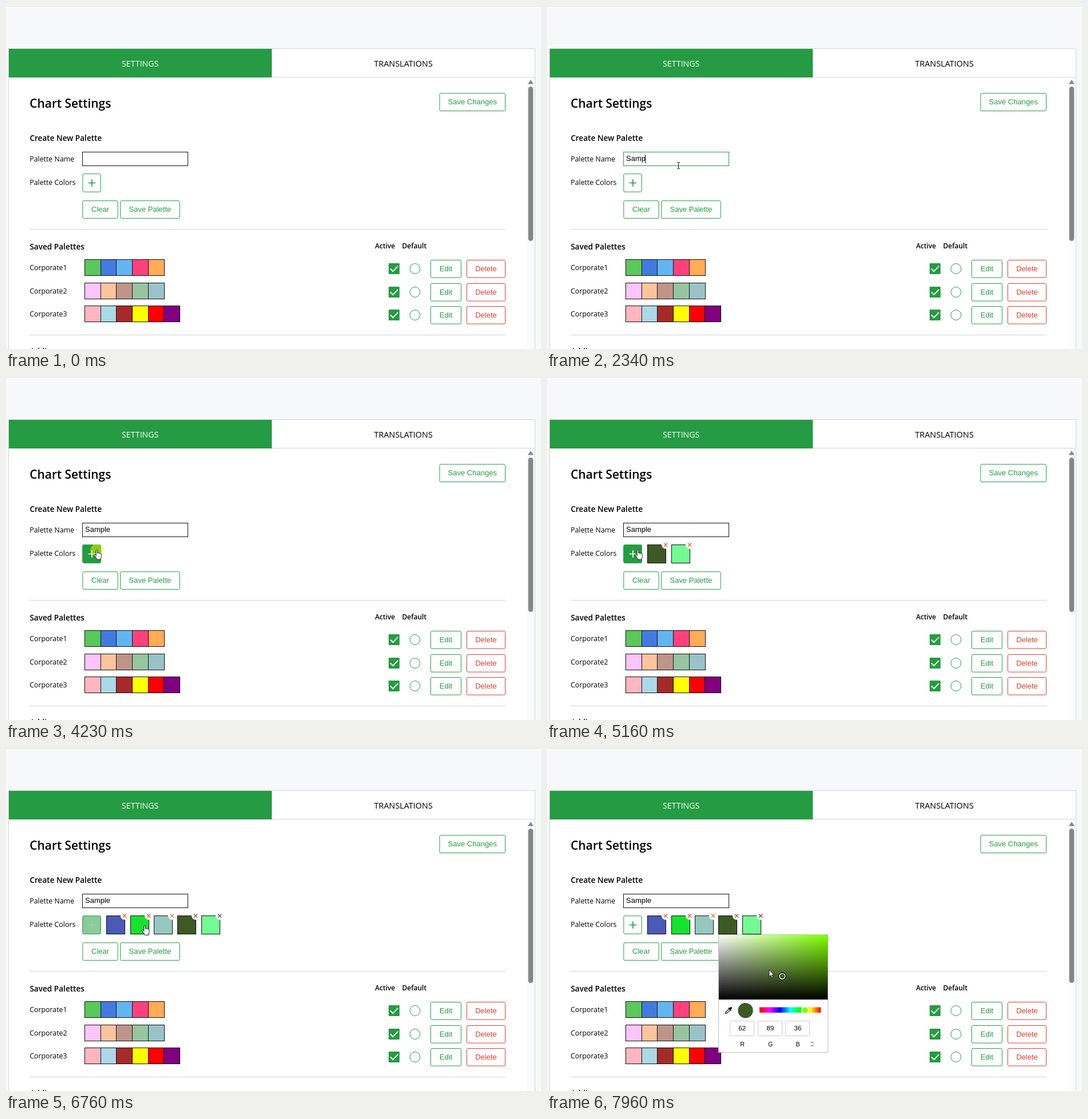
These frames come from a looping animation (934 px wide and 600 px high, 8000 ms). An HTML page:

```html
<!DOCTYPE html>
<html lang="en">
<head>
<meta charset="utf-8">
<title>Chart Settings</title>
<style>
  html, body { margin: 0; width: 100%; height: 100%; overflow: hidden; background: #f7f8fa; }
  svg { display: block; width: 934px; height: 600px; }
  .ui { font-family: "Open Sans", "Noto Sans", sans-serif; }
  .ctl { font-family: "Liberation Sans", Arial, sans-serif; font-size: 13px; }
  .semi { font-weight: 600; }
  .mid { text-anchor: middle; }
</style>
</head>
<body>
<svg id="stage" viewBox="0 0 934 600" xmlns="http://www.w3.org/2000/svg"></svg>
<script>
const LOOP = 8000;
const GREEN = '#259b43', RED = '#dc3e30', LINE = '#d2d4d6';

// Markup helpers
const rect = (x, y, w, h, fill, extra = '') =>
  `<rect x="${x}" y="${y}" width="${w}" height="${h}" fill="${fill}" ${extra}/>`;
const frame = (x, y, w, h, stroke, fill = '#fff', extra = '') =>
  rect(x + .5, y + .5, w - 1, h - 1, fill, `stroke="${stroke}" ${extra}`);
const path = (d, stroke, width = 1, fill = 'none', extra = '') =>
  `<path d="${d}" stroke="${stroke}" stroke-width="${width}" fill="${fill}" ${extra}/>`;
const circle = (x, y, r, fill, extra = '') =>
  `<circle cx="${x}" cy="${y}" r="${r}" fill="${fill}" ${extra}/>`;
const text = (s, x, y, size, cls = 'ui', fill = '#000') =>
  `<text x="${x}" y="${y}" class="${cls}" style="font-size:${size}px" fill="${fill}">${s}</text>`;
const button = (s, x, y, w, h, color = GREEN) =>
  frame(x, y, w, h, color, '#fff', 'rx="2"') + text(s, x + w / 2, y + h / 2 + 4, 13, 'ctl mid', color);
const plusButton = (fill, mark) =>
  frame(133.4, 293.2, 32.4, 32.5, GREEN, fill, 'rx="2"') +
  path('M143.7 309.5h12.6M150 303.2v12.6', mark, 1.7);
const group = (id, body) => `<g id="${id}">${body}</g>`;

function page() {
  return rect(0, 0, 934, 600, '#f7f8fa') + rect(0, 0, 934, 1, '#e4e6e8') +
    frame(4, 74, 920, 540, LINE) +
    rect(5, 124, 918, 1, LINE) + rect(5, 75, 459, 50, GREEN) +
    text('SETTINGS', 234.2, 106, 14.2, 'ui mid', '#fff') +
    text('TRANSLATIONS', 693.7, 106, 14.4, 'ui mid') +
    rect(909, 125, 14, 475, '#fcfcfc') +
    path('M911 136.4L916 129L921 136.4Z', 'none', 0, '#868686') +
    rect(911.7, 141, 8.6, 270, '#868686', 'rx="4.3"') +
    text('Chart Settings', 41.3, 177.8, 20.9, 'ui semi') +
    button('Save Changes', 756.5, 152.2, 115.5, 31.8) +
    text('Create New Palette', 41.4, 236.3, 13.6, 'ui semi') +
    text('Palette Name', 41.2, 272.3, 12.4) +
    text('Palette Colors', 41.2, 312.5, 12.4) +
    button('Clear', 133.4, 340.2, 62.3, 31.7) +
    button('Save Palette', 199.1, 340.2, 104.6, 31.7) +
    rect(41, 390, 831, 1, LINE) + rect(41, 575, 831, 1, LINE) +
    text('Saved Palettes', 41.4, 425.5, 13.6, 'ui semi') +
    text('Active', 661.7, 423.5, 11.9, 'ui semi mid') +
    text('Default', 712.8, 423.5, 12, 'ui semi mid') +
    text('Adding', 41.4, 609, 13.6, 'ui semi');
}

function savedRow(colors, i) {
  const y = Math.round(443 + i * 40.6), cy = y + 16.5;
  const cells = colors.map((c, k) =>
    frame(Math.round(137 + k * 27.67), y, 29, 29, '#111', c)).join('');
  return text('Corporate' + (i + 1), 41.2, y + 19, 12.35) + cells +
    rect(668, cy - 9.5, 19, 19, GREEN, 'rx="1"') +
    path(`M671 ${cy}l4.5 4.6l8.8-9.2`, '#fff', 1.8) +
    circle(714, cy, 8.9, '#fff', `stroke="${GREEN}"`) +
    button('Edit', 741, y + 1, 54, 31.6) +
    button('Delete', 804, y + 1, 68, 31.6, RED);
}

const saved = [
  ['#5ac85a', '#447ae0', '#63b5f2', '#fc417d', '#ffab57'],
  ['#fcc4fc', '#fcc49e', '#c0948a', '#97c5a0', '#9ac3c9'],
  ['#ffb6c1', '#add8e6', '#a52a2a', '#ffff00', '#ff0000', '#800080']
];

// Newest colour comes first
const added = ['#4b5ab5', '#18e130', '#96c8c0', '#3e5924', '#74fa93'];
const crossColors = ['#d8432f', '#d8432f', '#a8801c', '#8f3a22', '#5f2b1c'];

function swatch(color, slot) {
  const x = Math.round(175.1 + slot * 41.45);
  return frame(x, 293, 33, 33, '#111', color) +
    circle(x + 32, 293.5, 7, '#fff') +
    path(`M${x + 28.8} 290.3l6.4 6.4m0-6.4l-6.4 6.4`, crossColors[slot], 1.15);
}

function picker() {
  const hues = [0, 300, 240, 180, 120, 60, 0];
  const stops = hues.map((h, i) => `<stop offset="${i / 6}" stop-color="hsl(${h} 100% 50%)"/>`).join('');
  const channel = (name, value, x) =>
    frame(x, 477, 43, 27, '#ccc', '#fff', 'rx="1"') +
    text(value, x + 21.7, 494.2, 11.6, 'ctl mid') +
    text(name, x + 22, 521.7, 10.6, 'ctl mid');
  return `<defs>
      <linearGradient id="sat"><stop stop-color="#fff"/><stop offset="1" stop-color="#80ff00"/></linearGradient>
      <linearGradient id="dark" x2="0" y2="1"><stop stop-opacity="0"/><stop offset="1"/></linearGradient>
      <linearGradient id="hue">${stops}</linearGradient>
    </defs>` +
    frame(299, 326, 192, 207, '#bdbdbd') +
    rect(300, 327, 190, 113, 'url(#sat)') + rect(300, 327, 190, 113, 'url(#dark)') +
    circle(410.7, 399.3, 5.2, 'none', 'stroke="#000" stroke-width="3.2"') +
    circle(410.7, 399.3, 4.8, 'none', 'stroke="#fff" stroke-width="1.6"') +
    path('M311.5 464.5l.6-2.4 6.2-6.2 1.9 1.9-6.2 6.2z', '#111', 1.2) +
    path('M317 454.6l4.5 4.5M319.3 456.8l2.2-2.2', '#111', 2.2) +
    circle(321.2, 454.8, 1.9, '#111') +
    circle(346.5, 459.2, 13.2, '#3e5924') +
    rect(371, 453.5, 107, 9.5, 'url(#hue)') +
    circle(450.6, 458.6, 6, '#80ff00', 'stroke="#fff" stroke-width="1.8"') +
    channel('R', 62, 319) + channel('G', 89, 368) + channel('B', 36, 416) +
    path('M460.8 516.4l2.2-2.2l2.2 2.2m-4.4 3l2.2 2.2l2.2-2.2', '#222', 1);
}

const pointers = {
  arrow: path('M.5 .5V12.6L3.2 10.1L5 14.3L6.9 13.5L5.1 9.4H8.6Z', '#111', .9, '#fff'),
  beam: path('M-2.5-5.5H-.7L0-5L.7-5.5H2.5M0-5V5M-2.5 5.5H-.7L0 5L.7 5.5H2.5', '#111', 1),
  hand: path('M4.2 10.5V1.8c0-1.7 2.6-1.7 2.6 0V6.3c.3-1 2.2-1 2.4.4.4-.9 2-.8 2.2.5.5-.7 2-.4 2 1v4.3' +
    'c0 1-1.2 2-1.2 4.8H5.6c0-1.5-1-2.6-2-4.1L.9 9.6c-.6-1.2.9-2.3 1.9-1.2z',
    '#111', .95, '#fff', 'transform="translate(-5.4 -1)"')
};

const stage = document.getElementById('stage');
stage.innerHTML = page() + saved.map(savedRow).join('') +
  frame(133, 255, 185, 25, '#111', '#fff', 'id="field"') +
  text('', 138, 271, 13, 'ctl').replace('<text', '<text id="typed"') +
  rect(138, 260, 1, 15, '#000', 'id="caret"') +
  plusButton('#fff', GREEN) + group('hover', plusButton(GREEN, '#fff')) +
  group('swatches', '') + group('picker', picker()) +
  circle(0, 0, 11, '#ff0', 'id="press" fill-opacity=".47"') +
  group('pointer', Object.keys(pointers).map(k => group(k, pointers[k])).join(''));

const $ = id => document.getElementById(id);
const show = (id, on) => $(id).setAttribute('visibility', on ? 'visible' : 'hidden');
const set = (id, attrs) => { for (const k in attrs) $(id).setAttribute(k, attrs[k]); };
const within = (t, spans) => spans.some(([a, b]) => t >= a && t < b);
const passed = (t, times) => times.filter(v => t >= v).length;

// Pointer samples: time, x, y, shape
const moves = [
  [120, 843, 550, 'arrow'], [190, 715, 487, 'arrow'], [260, 540, 408, 'arrow'],
  [330, 370, 345, 'arrow'], [400, 245, 302, 'arrow'], [460, 184, 286, 'arrow'],
  [530, 228.5, 280, 'beam'], [870, 228.5, 279, 'beam'], [1400, 229.5, 279, 'beam'],
  [3270, 222, 282, 'arrow'], [3340, 206, 288, 'arrow'], [3410, 190, 293, 'arrow'],
  [3480, 176, 296, 'arrow'], [3550, 167.5, 297, 'arrow'], [3620, 163, 300, 'hand'],
  [3690, 159, 302, 'hand'], [3760, 158.4, 303, 'hand'],
  [6690, 180, 305, 'hand'], [6760, 242, 311, 'hand'], [6830, 300, 317, 'hand'],
  [6900, 317.5, 318, 'hand'], [7960, 387.5, 387.5, 'arrow']
];
const presses = [[1080, 1150], [4230, 4430], [4760, 4960], [5090, 5160],
  [5430, 5500], [5640, 5700], [7300, 7500]];
const keys = [1870, 2000, 2140, 2340, 2550, 2670];
const adds = [4430, 4960, 5230, 5500, 5700];

let shownCount = -1, shownText = null;

function update(t) {
  const move = moves[passed(t, moves.map(m => m[0])) - 1];
  show('pointer', move);
  if (move) {
    const [, x, y, shape] = move;
    set('pointer', { transform: `translate(${x} ${y})` });
    set('press', { cx: x, cy: y });
    for (const k in pointers) $(k).setAttribute('display', k === shape ? 'inline' : 'none');
  }
  show('press', within(t, presses));

  set('field', { stroke: t >= 1080 && t < 4230 ? GREEN : '#111' });
  const word = 'Sample'.slice(0, passed(t, keys));
  if (word !== shownText) {
    $('typed').textContent = shownText = word;
    set('caret', { x: 138 + Math.floor(word ? $('typed').getComputedTextLength() : 0) });
  }
  show('caret', within(t, [[1080, 1600], [1870, 3200]]));

  // The button colour fades in steps of one screen tick
  const tick = Math.floor(t / 70) * 70;
  const fade = (start, span) => Math.min(1, Math.max(0, (tick - start) / span));
  set('hover', { opacity: fade(3570, 210) - fade(6620, 210) });

  const count = passed(t, adds);
  if (count !== shownCount) {
    shownCount = count;
    $('swatches').innerHTML = added.slice(added.length - count).map(swatch).join('');
  }
  show('picker', t >= 7570);
}

function run(now) {
  update(now % LOOP);
  requestAnimationFrame(run);
}
update(0);
requestAnimationFrame(run);
</script>
</body>
</html>
```
